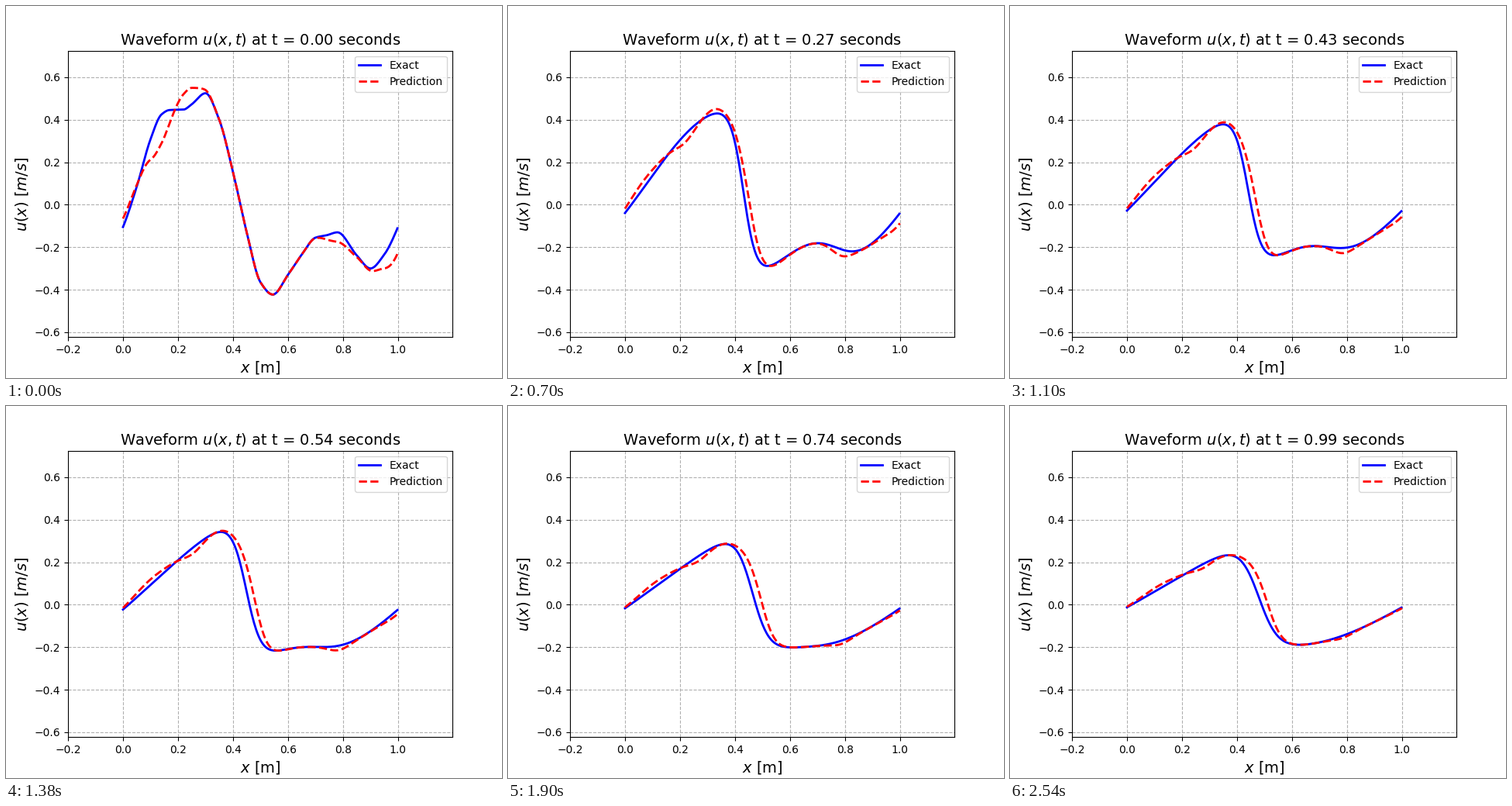
These frames come from a looping animation (640x480 px, 2560 ms). A matplotlib script:

```python
import numpy as np
import matplotlib.pyplot as plt
from matplotlib.animation import FuncAnimation

FRAMES = 128
STEP_MS = 20
DT = 4 / 511
NU = 0.01  # viscosity
N = 512    # cells in one period

# Key points of the initial wave, one period
KX, KU = np.array([
    (0, -.105), (.05, .085), (.1, .308), (.14, .425), (.17, .446),
    (.22, .448), (.25, .473), (.3, .525), (.35, .4), (.4, .155),
    (.45, -.13), (.5, -.365), (.545, -.423), (.6, -.33), (.65, -.235),
    (.7, -.155), (.74, -.144), (.78, -.13), (.85, -.238), (.9, -.3),
    (.95, -.235), (1, -.105),
]).T

# Prediction errors: centre, drift, width, height, lifetime
BUMPS = [
    (.13, 1, .035, -.1, .08),
    (.13, 1, .035, -.045, 1.2),
    (.235, 1, .035, .085, .2),
    (-.03, 1, .06, .045, 1),
    (.785, 0, .035, -.045, .7),
    (1, 0, .045, -.12, .3),
]


def initial(x):
    """Monotone cubic curve through the key points, periodic in x."""
    x = np.mod(x, 1)
    after = np.diff(KU) / np.diff(KX)
    before = np.roll(after, 1)
    same = after * before > 0
    slope = np.where(same, 2 * after * before / (after + before), 0)
    slope = np.append(slope, slope[0])
    i = np.searchsorted(KX, x, side="right") - 1
    h = KX[i + 1] - KX[i]
    s = (x - KX[i]) / h
    return ((1 + 2 * s) * (1 - s) ** 2 * KU[i]
            + s * (1 - s) ** 2 * h * slope[i]
            + s * s * (3 - 2 * s) * KU[i + 1]
            + s * s * (s - 1) * h * slope[i + 1])


# Periodic potential of the initial wave
u_mid = initial((np.arange(N) + 0.5) / N)
u_mid -= u_mid.mean()
cell = np.arange(-N, 2 * N + 1)
y = cell / N
potential = np.append(0, np.cumsum(u_mid)[:-1])[cell % N] / N


def exact(x, t):
    """Viscous Burgers wave by the Cole-Hopf formula."""
    if t == 0:
        return initial(x)
    gap = x[:, None] - y
    g = potential + gap ** 2 / (2 * t)
    w = np.exp((g.min(axis=1, keepdims=True) - g) / (2 * NU))
    return (w * gap).sum(axis=1) / w.sum(axis=1) / t


def bell(x, centre, width):
    return np.exp(-((x - centre) / width) ** 2 / 2)


def predicted(x, t):
    """Exact wave with a late front and drifting, fading errors."""
    lag = 0.026 * (1 - np.exp(-t / 0.25)) * bell(x, 0.48, 0.07)
    drift = 0.15 * (1 - np.exp(-t / 0.3))
    u = exact(x - lag, t)
    for centre, speed, width, height, life in BUMPS:
        u += height * np.exp(-t / life) * bell(x, centre + speed * drift, width)
    return u


x_exact = np.arange(0, N, 2) / N
x_exact = np.append(x_exact, (N - 1) / N)
x_pred = np.linspace(0, 1, 257)

fig, ax = plt.subplots(figsize=(6.4, 4.8), dpi=100)
exact_line, = ax.plot(x_exact, exact(x_exact, 0), "b-", linewidth=2,
                      label="Exact")
pred_line, = ax.plot(x_pred, predicted(x_pred, 0), "r--", linewidth=2,
                     label="Prediction")
ax.set_xlim(-0.2, x_exact[-1] + 0.2)
ax.set_ylim(-0.6232, 0.7255)
ax.set_xlabel("$x$ [m]", fontsize=14)
ax.set_ylabel("$u(x)$ [$m/s$]", fontsize=14)
title = ax.set_title("", fontsize=14)
ax.grid(True, linestyle="--")
ax.legend(loc="upper right")


def draw(frame):
    t = frame * DT
    exact_line.set_ydata(exact(x_exact, t))
    pred_line.set_ydata(predicted(x_pred, t))
    title.set_text(f"Waveform $u(x, t)$ at t = {t:.2f} seconds")
    return exact_line, pred_line, title


anim = FuncAnimation(fig, draw, frames=FRAMES, interval=STEP_MS,
                     repeat=True, repeat_delay=0, blit=False)
plt.show()
```
